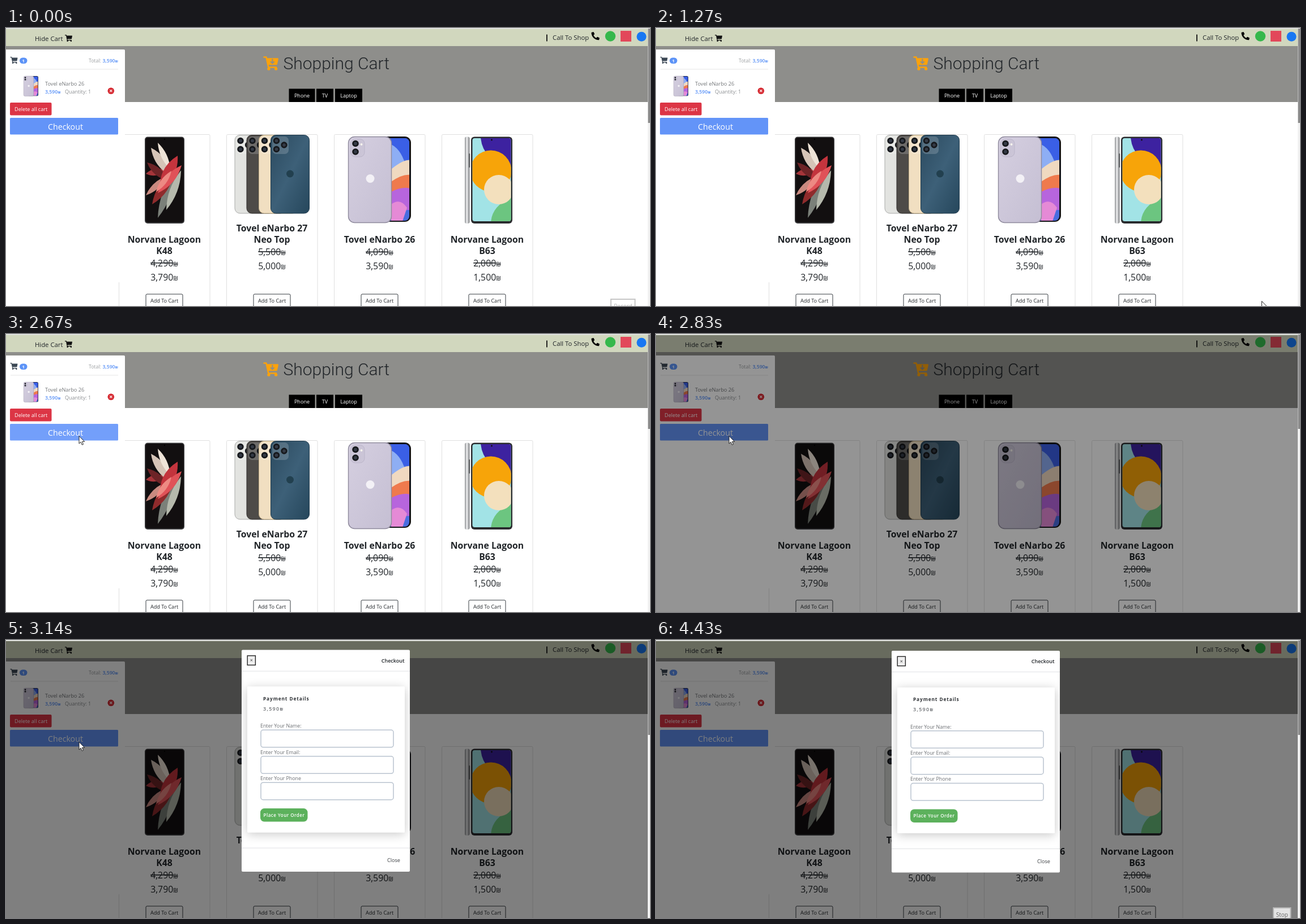
These frames come from a looping animation (1137x492 px, 4590 ms). An HTML page:

```html
<!DOCTYPE html>
<html lang="en">
<head>
<meta charset="utf-8">
<title>Shopping Cart</title>
<style>
html, body { margin: 0; width: 100%; height: 100%; overflow: hidden; background: #fff; }
svg { display: block; width: 1137px; height: 492px; }
text { font-family: "Open Sans", "Noto Sans", sans-serif; white-space: pre; }
.mid { text-anchor: middle; }
.end { text-anchor: end; }
</style>
</head>
<body>
<svg id="stage" viewBox="0 0 1137 492">
  <defs>
    <g id="cart">
      <path d="M1 1.5H5L9 20H23" fill="none" stroke="currentColor" stroke-width="2.6" stroke-linecap="round" stroke-linejoin="round"/>
      <path d="M6 3.2H26Q27.4 3.2 27 4.8L24.9 14.4Q24.6 15.6 23.4 15.6H8.5Z" fill="currentColor"/>
      <circle cx="9.6" cy="22.6" r="2.7" fill="currentColor"/>
      <circle cx="22.6" cy="22.6" r="2.7" fill="currentColor"/>
    </g>
    <linearGradient id="blueBack" x2="1" y2="1">
      <stop stop-color="#2b4a5f"/><stop offset=".5" stop-color="#3d6078"/><stop offset="1" stop-color="#26475c"/>
    </linearGradient>
    <linearGradient id="lilac" x2="1" y2="1">
      <stop stop-color="#d5cfe0"/><stop offset="1" stop-color="#c5bfd3"/>
    </linearGradient>
    <linearGradient id="side">
      <stop stop-color="#8d8f92"/><stop offset=".45" stop-color="#f0f1f2"/><stop offset="1" stop-color="#77797c"/>
    </linearGradient>
    <filter id="shadow" x="-20%" y="-20%" width="140%" height="140%">
      <feDropShadow dx="0" dy="3" stdDeviation="9" flood-color="#000" flood-opacity=".22"/>
    </filter>
    <clipPath id="dialogClip"><rect x="416" y="19" width="297" height="392.5" rx="2"/></clipPath>
    <clipPath id="screenA"><rect x="247" y="194.500" width="66" height="149" rx="4"/></clipPath>
    <clipPath id="screenC"><rect x="642" y="195" width="70" height="146" rx="8"/></clipPath>
    <clipPath id="screenD"><rect x="823.500" y="195" width="68" height="147" rx="4"/></clipPath>
  </defs>

  <rect width="1137" height="492" fill="#fff"/>
  <rect width="1137" height="2" fill="#e7e8ea"/>
  <rect y="1.500" width="1133" height="30.500" fill="#d1d7be"/>
  <rect y="32" width="1133" height="99" fill="#8e8e8b"/>
  <g id="shop"></g>

  <rect x="-4" y="38" width="214" height="412" rx="2" fill="#fff"/>
  <g id="panel"></g>

  <rect id="dim" y="2" width="1133" height="490" fill="#000"/>
  <rect x="1133" y="0" width="4" height="492" fill="#f1f1f1"/>
  <rect x="1133.500" y="1" width="3.500" height="167" fill="#8a8a8a"/>
  <g id="dialog"></g>
  <g id="record"></g>
  <g id="stop"></g>
  <path id="pointer" d="M.5 .5V14L3.600 11.200L5.800 16.200L8 15.200L5.900 10.400H10.200Z" fill="#fff" stroke="#111" stroke-width=".9"/>
</svg>
<script>
const $ = id => document.getElementById(id);
const LOOP = 4590;

const rect = (x, y, w, h, fill, rx = 0, extra = '') =>
  `<rect x="${x}" y="${y}" width="${w}" height="${h}" fill="${fill}" rx="${rx}" ${extra}/>`;
const disc = (x, y, r, fill, extra = '') =>
  `<circle cx="${x}" cy="${y}" r="${r}" fill="${fill}" ${extra}/>`;
const text = (x, y, size, str, fill = '#212529', extra = '') =>
  `<text x="${x}" y="${y}" font-size="${size}" fill="${fill}" ${extra}>${str}</text>`;
const icon = (x, y, scale, color) =>
  `<use href="#cart" transform="translate(${x} ${y}) scale(${scale})" color="${color}"/>`;
const price = n => `${n}<tspan font-size=".68em">₪</tspan>`;
const MID = 'class="mid"', END = 'class="end"', BOLD = 'font-weight="700"', SEMI = 'font-weight="600"';

// Leaf shape between two points, used for the feather wallpaper.
function leaf(x1, y1, x2, y2, w, fill) {
  const len = Math.hypot(x2 - x1, y2 - y1);
  const nx = (y1 - y2) / len * w, ny = (x2 - x1) / len * w;
  const mx = (x1 + x2) / 2, my = (y1 + y2) / 2;
  return `<path fill="${fill}" d="M${x1} ${y1}Q${mx + nx} ${my + ny} ${x2} ${y2}Q${mx - nx} ${my - ny} ${x1} ${y1}Z"/>`;
}

const lens = (x, y, r) => disc(x, y, r, '#16181c') + disc(x, y, r * .5, '#343a46');

function featherPhone() {
  return rect(245, 192.5, 70, 153.5, '#3b3b3d', 5) + rect(246.5, 194, 67, 150, '#120f10', 4) +
    '<g clip-path="url(#screenA)">' +
    leaf(300, 250, 268, 336, 15, '#7b8079') + leaf(309, 252, 283, 322, 13, '#b5b9ac') +
    leaf(296, 256, 258, 312, 16, '#8f2b2c') + leaf(284, 262, 247, 296, 11, '#c98a80') +
    leaf(281, 252, 247, 258, 12, '#a5353a') + leaf(286, 270, 249, 238, 13, '#6d2427') +
    leaf(292, 262, 256, 212, 16, '#d5c4b7') + leaf(290, 250, 268, 203, 10, '#efe4d8') +
    leaf(272, 285, 303, 226, 20, '#c3343d') + leaf(268, 292, 310, 243, 15, '#e05258') +
    leaf(265, 290, 292, 253, 10, '#ed8a83') + '</g>' + disc(280, 197, 1.2, '#000');
}

function quadPhone() {
  const back = (x, fill, edge) =>
    rect(x + .5, 189.5, 68, 138.5, fill, 9, `stroke="${edge}"`) +
    rect(x + 3, 192, 29, 31, '#fff', 7, 'opacity=".18"') +
    lens(x + 10.5, 199.5, 5.7) + lens(x + 10.5, 214.5, 5.7) + lens(x + 24, 207, 5.7);
  return back(403.5, '#e2e3e0', '#a9aaa8') + back(424.5, '#4e4b48', '#33302e') +
    back(446, '#f1dfc1', '#bba780') + back(467, 'url(#blueBack)', '#1f3a4c') +
    disc(501.5, 258, 6.5, '#22404f');
}

function lilacPhone() {
  return rect(639, 192, 76, 151, '#141418', 11) +
    '<g clip-path="url(#screenC)">' + rect(640, 194, 74, 150, '#4a6de0') +
    '<path d="M680 194H714V232Q694 238 680 216Z" fill="#3a5fe6"/>' +
    '<path d="M680 206Q700 216 707 250L680 262Z" fill="#8eaef4"/>' +
    '<path d="M680 250Q702 232 714 234V262Q698 278 680 276Z" fill="#f0d9c0"/>' +
    '<path d="M680 272Q700 258 714 260V288L680 296Z" fill="#ef7a4d"/>' +
    '<path d="M680 290Q700 280 714 284V322L680 324Z" fill="#b765dd"/>' +
    '<path d="M680 312Q696 300 708 318L700 342H680Z" fill="#e58ad6"/></g>' +
    rect(604.5, 192.5, 76, 152, 'url(#lilac)', 11, 'stroke="#8f8a9d" stroke-width="1.4"') +
    rect(608.5, 196.5, 24.5, 31.5, '#cbc5d7', 8, 'stroke="#b7b0c6" stroke-width=".8"') +
    lens(617, 204.5, 5.8) + lens(617, 219, 5.8) + disc(627.5, 206, 2, '#f7f4ee') +
    disc(643, 266.5, 7.5, '#f3f1f6');
}

function bubblePhone() {
  return rect(810, 192.5, 8.5, 153.5, 'url(#side)', 3) +
    rect(817.3, 222, 1.8, 25, '#4b4c4f', 1) +
    rect(821, 192.5, 73, 153.5, '#2a2b2e', 6) +
    '<g clip-path="url(#screenD)">' + rect(823, 194, 70, 150, '#a2e3e6') +
    '<path d="M838 194H893V246Q842 236 838 194Z" fill="#3d22a0"/>' +
    '<path d="M893 300V344H856Q858 314 893 300Z" fill="#6cc580"/>' +
    disc(856, 253, 36.5, '#f7a409') + disc(870, 286, 26, '#f3e0bd') + '</g>' +
    disc(857.5, 198, 1.4, '#111');
}

function card(left, lines, before, now, top) {
  const cx = left + 80.5;
  const below = top + 19.5 * (lines.length - 1);
  return rect(left + .5, 188.5, 160.5, 330, '#fff', 2, 'stroke="#dfdfdf"') +
    lines.map((s, i) => text(cx, top + 19.5 * i, 15.8, s, '#212529', `${MID} ${BOLD}`)).join('') +
    text(cx, below + 22, 15.8, price(before), '#212529', `${MID} text-decoration="line-through"`) +
    text(cx, below + 47, 15.8, price(now), '#212529', MID) +
    rect(cx - 32.5, 471, 65, 24, '#fff', 2, 'stroke="#343a40"') +
    text(cx, 485.5, 9.1, 'Add To Cart', '#212529', MID);
}

function tab(x, w, label) {
  return rect(x, 107.5, w, 23.5, '#000') + text(x + w / 2, 123, 9.1, label, '#fff', MID);
}

$('shop').innerHTML =
  text(51, 22.5, 11.3, 'Hide Cart') + icon(104, 12, .48, '#111') +
  rect(954, 11.5, 1.8, 12, '#111') + text(965, 20.5, 11.3, 'Call To Shop') +
  '<path transform="translate(1033.500 7) scale(.028)" fill="#000" d="M497 362l-112-48a24 24 0 0 0-28 7l-50 60A371 371 0 0 1 131 204l60-50a24 24 0 0 0 7-28l-48-112A24 24 0 0 0 123 1L19 25A24 24 0 0 0 0 48c0 256 208 464 464 464a24 24 0 0 0 23-19l24-104a24 24 0 0 0-14-27z"/>' +
  disc(1067, 14.5, 9.2, '#35b84b') + rect(1085, 5, 19, 19, '#e2485a') + disc(1122, 15.2, 8.5, '#1877f2') +
  icon(454.5, 50, .98, '#fba20c') +
  '<path d="M470.300 54.500V62M467 59.300L470.300 62.600L473.600 59.300" fill="none" stroke="#8e8e8b" stroke-width="2"/>' +
  text(489.5, 72.5, 30, 'Shopping Cart', '#212529', 'font-weight="300" style="font-family:Roboto,sans-serif"') +
  tab(499.5, 46, 'Phone') + tab(548, 30, 'TV') + tab(581, 48, 'Laptop') +
  card(199, ['Norvane Lagoon', 'K48'], '4,290', '3,790', 380) +
  card(389, ['Tovel eNarbo 27', 'Neo Top'], '5,500', '5,000', 360) +
  card(579, ['Tovel eNarbo 26'], '4,090', '3,590', 380) +
  card(769, ['Norvane Lagoon', 'B63'], '2,000', '1,500', 380) +
  featherPhone() + quadPhone() + `<g id="lilacPhone">${lilacPhone()}</g>` + bubblePhone();

$('panel').innerHTML =
  icon(7.5, 51, .48, '#3b4754') + rect(24, 52.5, 13.5, 10.5, '#5c93f7', 5.2) +
  text(30.7, 60.7, 7.5, '1', '#fff', `${MID} ${BOLD}`) +
  text(146, 60.5, 8.6, 'Total:', '#9a9da0') +
  text(198, 60.5, 8.7, price('3,590'), '#5c93f7', `${END} ${SEMI}`) +
  rect(8, 72.5, 190, 1, '#e6e6e6') +
  '<use href="#lilacPhone" transform="translate(31 85) scale(.234) translate(-604 -192)"/>' +
  text(69, 102, 9.2, 'Tovel eNarbo 26', '#74777a') +
  text(69, 116.2, 8.7, price('3,590'), '#5c93f7', SEMI) +
  text(104, 116.2, 9, 'Quantity: 1', '#8b8e91') +
  disc(185.3, 111.3, 5.8, '#d62a32') +
  '<path d="M183.200 109.200l4.200 4.200m0-4.200l-4.200 4.200" stroke="#fff" stroke-width="1.200"/>' +
  rect(7, 132, 73.5, 22.5, '#dc3545', 2) + text(15, 146.8, 9.1, 'Delete all cart', '#fff') +
  rect(7, 159, 191, 29.5, '#6394f8', 1.5, 'id="pay"') +
  text(105, 180, 14.2, 'Checkout', '#fff', MID);

const field = (y, label) => text(449, y, 8.85, label, '#6b6e72') +
  rect(450, y + 4.2, 234, 30.5, '#fff', 4, 'stroke="#b9c3cf" stroke-width="1.500"');

$('dialog').innerHTML =
  rect(416, 19, 297, 392.5, '#fff', 2) +
  '<g clip-path="url(#dialogClip)">' +
  rect(426, 84, 278, 258, '#fff', 2, 'filter="url(#shadow)"') + '</g>' +
  rect(416, 56, 297, 1, '#e0e2e5') + rect(416, 369, 297, 1, '#e0e2e5') +
  rect(426.2, 29.2, 14.2, 16.6, '#efefef', 0, 'stroke="#222" stroke-width="1.400"') +
  text(433.3, 40.8, 9, '×', '#333', MID) +
  text(703.5, 41.3, 9, 'Checkout', '#212529', `${END} ${SEMI}`) +
  text(454, 108, 8.3, 'Payment Details', '#2c2f33', `${BOLD} letter-spacing=".9"`) +
  text(454, 126, 9, price('3,590'), '#6b6e72', `${SEMI} letter-spacing="1.300"`) +
  field(156.5, 'Enter Your Name:') + field(203, 'Enter Your Email:') + field(249.4, 'Enter Your Phone') +
  rect(449, 299.5, 83.5, 23.5, '#5cb15c', 7) +
  text(454.5, 314.3, 8, 'Place Your Order', '#fff', `${SEMI} letter-spacing=".500"`) +
  text(673, 394.5, 9.1, 'Close', '#3a3d41');

$('record').innerHTML = rect(1068, 480, 42.5, 30, '#fff', 0, 'stroke="#c6c6c6" stroke-width="2"') +
  text(1089.5, 495.5, 10, 'Record', '#b5b5b5', MID);
$('stop').innerHTML = rect(1090, 474, 30.5, 30, '#e4e4e4', 0, 'stroke="#b4b4b4" stroke-width="2"') +
  text(1105.3, 490.3, 10, 'Stop', '#666', MID);

// Each row: start time, then the values held until the next row.
const POINTER = [
  [0, -50, -50], [560, 1101, 480], [690, 1090, 482], [980, 1079, 478], [1130, 1088, 469],
  [1270, 1069, 483], [1400, 997, 443], [1550, 800, 377], [1680, 589, 315], [1830, 352, 252],
  [1980, 225, 220], [2110, 148, 197], [2260, 139, 186], [2390, 126, 173], [2670, 128.5, 180],
  [3290, 390, 270], [3420, 666, 359], [3570, 902, 432], [3740, 1071, 479], [3860, -50, -50]
];
const DIM = [[0, 0], [2830, .42], [2980, .5]];
const DIALOG = [[0, 0, -28], [2980, .62, -15], [3140, 1, -1.4], [3290, 1, 0]];

const held = (rows, t) => rows.filter(r => r[0] <= t).pop().slice(1);
const show = (id, on) => $(id).setAttribute('visibility', on ? 'visible' : 'hidden');

function draw(t) {
  const [x, y] = held(POINTER, t);
  const [alpha, shift] = held(DIALOG, t);
  $('pointer').setAttribute('transform', `translate(${x} ${y})`);
  $('dim').setAttribute('opacity', held(DIM, t)[0]);
  $('dialog').setAttribute('opacity', alpha);
  $('dialog').setAttribute('transform', `translate(0 ${shift})`);
  $('pay').setAttribute('fill', t >= 2260 && t < 2830 ? '#739ffa' : '#6394f8');
  show('record', t < 140);
  show('stop', t >= 4430);
}

const start = performance.now();
function tick() {
  draw((performance.now() - start) % LOOP);
  requestAnimationFrame(tick);
}
tick();
</script>
</body>
</html>
```
